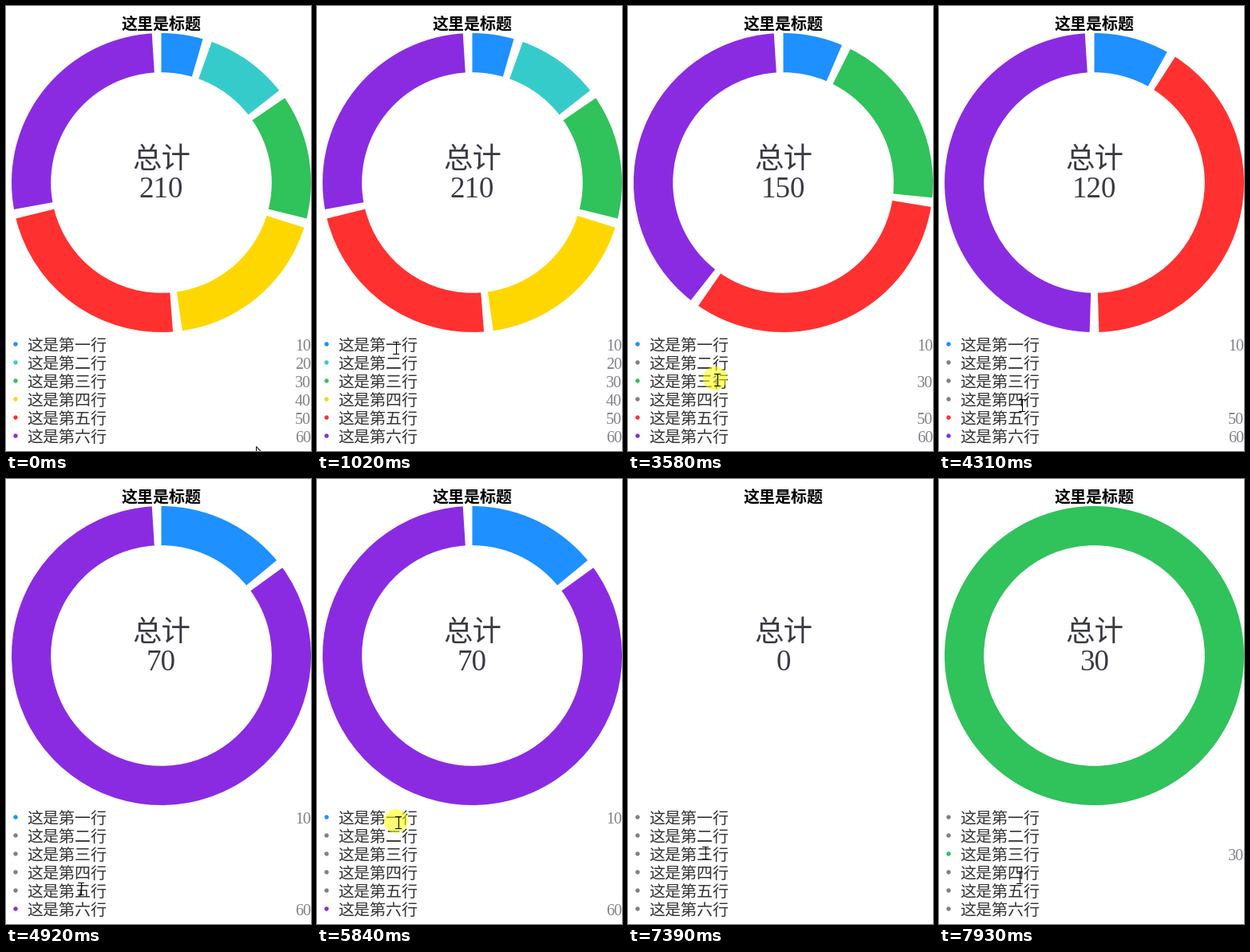
These frames come from a looping animation (382 px wide and 558 px high, 8000 ms). A matplotlib script:

```python
import numpy as np
import matplotlib.pyplot as plt
from matplotlib.animation import FuncAnimation
from matplotlib.patches import Circle, Polygon, Wedge

W, H, DPI = 382, 558, 100
LOOP, STEP, TICK = 8000, 20, 77
CENTER, OUTER, INNER = (194.5, 221.5), 187.5, 138.3
GAP = 3.6
ROW_Y, ROW_H = 432, 23
SERIF = "Liberation Serif"
INK, GREY = "#3a3a44", "#808088"

NUMERALS = "一二三四五六"
COLORS = ["#1e90ff", "#36cbcb", "#30c25b", "#ffd700", "#ff3030", "#8a2be2"]
VALUES = [10 * (i + 1) for i in range(len(COLORS))]

# pointer glides: (start, end, x, y)
START = (313, 552)
GLIDES = [
    (0, 860, 105, 430), (860, 1020, 96, 427), (1020, 1320, 84, 445),
    (2110, 2340, 84, 490), (3040, 3200, 88, 493), (3270, 3510, 109, 467),
    (3990, 4310, 101, 499), (4380, 4540, 91, 512), (5070, 5690, 99, 429),
    (6080, 6700, 84, 540), (7080, 7390, 94, 467), (7770, 7930, 98, 498),
]
# mouse button: (down, up); the row under the pointer toggles on release
CLICKS = [(1490, 1640), (2570, 2740), (3580, 3750), (4770, 4920),
          (5840, 6010), (6930, 7010), (7470, 7620)]


def pointer(t):
    """Eased glides, sampled in capture ticks."""
    pos = np.array(START, float)
    for t0, t1, x, y in GLIDES:
        if t < t0:
            break
        n = round((t1 - t0) / TICK)
        u = min(int((t - t0) / (t1 - t0) * n) / n, 1)
        pos += (np.array([x, y]) - pos) * u * u * (3 - 2 * u)
    return np.round(pos)


def active_rows(t):
    on = [True] * len(VALUES)
    for _, up in CLICKS:
        if t >= up:
            row = round((pointer(up)[1] - ROW_Y + 11) / ROW_H)
            on[row] = not on[row]
    return on


fig = plt.figure(figsize=(W / DPI, H / DPI), dpi=DPI, facecolor="white")
ax = fig.add_axes([0, 0, 1, 1])
ax.set_xlim(0, W)
ax.set_ylim(H, 0)
ax.axis("off")


def label(x, y, s, px, font="Noto Sans CJK JP", **kw):
    return ax.text(x, y, s, fontsize=px * 72 / DPI, family=font, **kw)


label(194.5, 29, "这里是标题", 20, weight="bold", ha="center")
label(194.5, 202.5, "总计", 36.5, weight="light", color=INK, ha="center")
total = label(194.5, 240, "", 37, SERIF, color=INK, ha="center")

wedges, dots, numbers = [], [], []
for i, (value, color) in enumerate(zip(VALUES, COLORS)):
    y = ROW_Y + ROW_H * i
    wedges.append(ax.add_patch(Wedge(CENTER, OUTER, 0, 1, width=OUTER - INNER,
                                     fc=color, lw=0)))
    dots.append(ax.add_patch(Circle((12, y - 8), 2.7, lw=0)))
    label(26.7, y, f"这是第{NUMERALS[i]}行", 20, weight="light", color="#333333")
    numbers.append(label(382, y, str(value), 20, SERIF, color=GREY, ha="right"))

halo = ax.add_patch(Circle(START, 15, fc="#ffff00", alpha=0.55, lw=0, zorder=5))

ARROW = np.array([(0, 0), (0, 16.5), (3.8, 13), (6.5, 19), (9, 18),
                  (6.4, 12), (11.5, 12)])
arrow = ax.add_patch(Polygon(ARROW, fc="white", ec="black", lw=0.72, zorder=6))

# text cursor: a stem between two split serifs, 7 x 16 pixels
serif_x = [-3.5, -0.5, np.nan, 0.5, 3.5, np.nan]
BEAM_X = np.array(serif_x + [0, 0, np.nan] + serif_x)
BEAM_Y = np.repeat([-7.5, -7, 7, 7.5], [6, 1, 2, 6])
beam, = ax.plot([], [], color="black", lw=0.72, antialiased=False,
                solid_capstyle="butt", zorder=6)


def draw(i):
    t = i * STEP + STEP / 2
    on = active_rows(t)
    amount = sum(v for v, shown in zip(VALUES, on) if shown)
    gap = GAP if sum(on) > 1 else 0
    scale = (360 - gap * sum(on)) / max(amount, 1)
    total.set_text(str(amount))

    angle = -90
    for k, shown in enumerate(on):
        wedges[k].set_visible(shown)
        numbers[k].set_visible(shown)
        dots[k].set_facecolor(COLORS[k] if shown else GREY)
        if shown:
            end = angle + VALUES[k] * scale
            wedges[k].set_theta1(angle)
            wedges[k].set_theta2(end)
            angle = end + gap

    x, y = pointer(t)
    over_text = x < 127 and y > 414
    halo.set_center((x, y))
    halo.set_visible(any(down <= t < up for down, up in CLICKS))
    arrow.set_visible(not over_text)
    arrow.set_xy(ARROW + (x + 0.5, y + 0.5))
    beam.set_visible(over_text)
    beam.set_data(BEAM_X + x + 2.5, BEAM_Y + y + 1)
    return [*wedges, *dots, *numbers, total, halo, arrow, beam]


anim = FuncAnimation(fig, draw, frames=LOOP // STEP, interval=STEP,
                     repeat=True, repeat_delay=0, blit=False)
plt.show()
```
